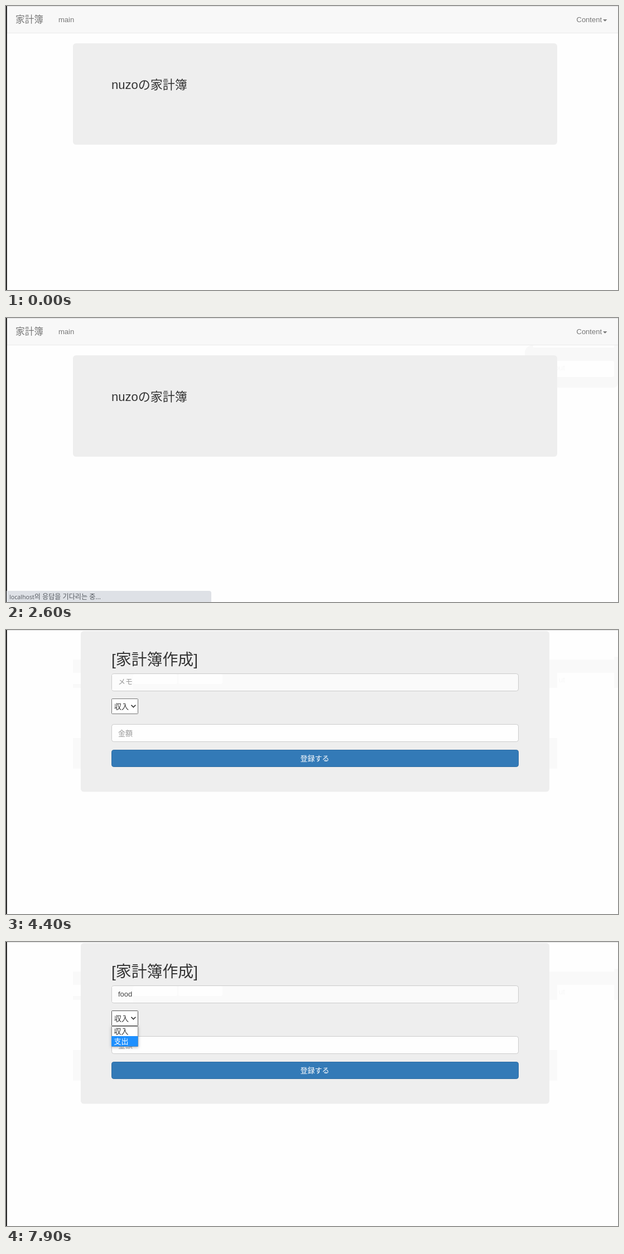
An HTML page with a canvas that plays this animation: 1097x510 px, repeating every 8 s.

```html
<!DOCTYPE html>
<html lang="ja">
<head>
<meta charset="utf-8">
<title>家計簿</title>
<style>
html, body { margin: 0; width: 100%; height: 100%; overflow: hidden; background: #fefefe; }
canvas { display: block; }
</style>
</head>
<body>
<canvas id="stage" width="1097" height="510"></canvas>
<script>
const ctx = document.getElementById('stage').getContext('2d');
const W = 1097, H = 510, LOOP = 8000;
const SANS = '"Liberation Sans", "Noto Sans CJK JP", sans-serif';
const UI = '"Open Sans", "Noto Sans CJK KR", sans-serif';
const GHOST = '#f9f9f9', PAPER = '#fefefe';

// Share of a fade done at time t, in steps of 100 ms
const fade = (t, start, steps) =>
  Math.max(0, Math.min(1, (Math.floor((t - start) / 100) + 1) / steps));

function rect(x, y, w, h, color) {
  ctx.fillStyle = color;
  ctx.fillRect(x, y, w, h);
}

function box(x, y, w, h, r, fill, stroke) {
  ctx.beginPath();
  ctx.roundRect(x, y, w, h, r);
  if (fill) { ctx.fillStyle = fill; ctx.fill(); }
  if (stroke) { ctx.strokeStyle = stroke; ctx.lineWidth = 1; ctx.stroke(); }
}

function text(str, x, y, color = '#333', size = 13, weight = '', family = SANS) {
  ctx.font = `${weight} ${size}px ${family}`;
  ctx.fillStyle = color;
  ctx.fillText(str, x, y);
}

function withAlpha(alpha, draw) {
  if (alpha <= 0) return;
  ctx.save();
  ctx.globalAlpha = alpha;
  draw();
  ctx.restore();
}

function shadow(color, blur, dy = 0) {
  ctx.shadowColor = color;
  ctx.shadowBlur = blur;
  ctx.shadowOffsetY = dy;
}

function frame() {
  rect(0, 0, W, 1, '#dcdcdc');
  rect(0, 0, 1, H, '#000');
  rect(1, 0, 1, H, '#555');
}

function navbar(mainY) {
  rect(2, 1, W, 47, '#f8f8f8');
  rect(2, 48, W, 1, '#e9e9e9');
  text('家計簿', 17, 30, '#777', 16.7);
  text('main', 94, mainY, '#777');
}

function contentLink(color, open) {
  if (open) rect(1009, 1, 82, 47, '#e7e7e7');
  text('Content', 1022.5, 29, color);
  ctx.beginPath();
  ctx.moveTo(1070, 24);
  ctx.lineTo(1077.5, 24);
  ctx.lineTo(1073.7, 27.8);
  ctx.fill();
}

function menu(hover) {
  ctx.save();
  shadow('rgba(0,0,0,.175)', 11, 5.6);
  box(942, 49, 149, 57, [0, 0, 4, 4], '#fff');
  ctx.restore();
  box(942.5, 48.5, 148, 57, [0, 0, 4, 4], null, '#d0d0d0');
  if (hover) rect(943, 54, 147, 23.5, '#f5f5f5');
  text('Household', 962, 70, hover ? '#262626' : '#333');
  text('Logout', 962, 94);
}

// Faint traces the closed menu leaves on the page
function menuGhost() {
  box(930, 49, 167, 76, [14, 0, 8, 14], '#f8f8f8');
  rect(945, 49, 145, 4, PAPER);
  box(945, 77, 145, 29, 3, PAPER);
  text('Logout', 962, 94, '#f7f7f7');
}

function status(str, tail, minWidth) {
  ctx.font = `10.7px ${UI}`;
  const w = ctx.measureText(str).width;
  box(1, 490, minWidth || w + 12, 20, [0, 4, 0, 0], '#dee1e6');
  text(str, 6, 505, '#555a60', 10.7, '', UI);
  if (tail) text(tail, 6 + w, 505, '#555a60', 12.1, '', UI);
}

const waiting = () => status('localhost', '의 응답을 기다리는 중...', 367);

function homePage(t) {
  if (t >= 2500) menuGhost();
  navbar(29);
  const open = t >= 1600 && t < 2500;
  contentLink(open ? '#555' : t >= 200 && t < 1600 ? '#333' : '#777', open);
  box(120, 67, 868, 182, 5.5, '#eee');
  text('nuzoの家計簿', 189, 149, '#333', 22);
  if (open) menu(t >= 2200);
  frame();
  if (t >= 2600) waiting();
  else withAlpha(fade(t, 500, 2), () =>
    status('localhost:8888/' + (t < 2200 ? '#' : 'household')));
}

function blueButton(label, x, w, hover) {
  const g = ctx.createLinearGradient(0, 67 - 15 * hover, 0, 95 - 15 * hover);
  g.addColorStop(0, '#0088cc');
  g.addColorStop(1, '#0044cc');
  box(x, 67, w, 28, 4, g);
  box(x + .5, 67.5, w - 1, 27, 4, null, 'rgba(0,50,130,.25)');
  text(label, x + 12.3, 86, '#fff');
}

function searchRow(label, hint, y, fill) {
  text(label, 2, y + 12);
  box(109.5, y + .5, 175, 18, 3.7, fill, '#ccc');
  text(hint, 115.5, y + 13.5, '#999');
}

function listPage(t) {
  menuGhost();
  box(120, 67, 868, 182, 5.5, GHOST);
  rect(988, 104, 109, 30, PAPER);
  navbar(25);
  blueButton('家計簿作成', 2, 88.5, fade(t, 3700, 2));
  blueButton('総収入', 95, 63, 0);
  blueButton('総支出', 162.5, 63, 0);
  blueButton('最小金額', 230, 76, 0);
  blueButton('最高金額', 310, 76, 0);

  rect(2, 104, W, 91, '#e3e3e3');
  rect(2, 105, W, 89, '#f5f5f5');
  const heads = [['No.', 28], ['メモ', 174], ['タイプ', 339], ['金額', 557], ['作成日', 722]];
  for (const [label, x] of heads) text(label, x, 143, '#333', 13, 'bold');
  rect(20, 155.5, 1067, 1.8, '#d9d9d9');

  searchRow('総収入 or 総支出 :', '総収入 or 総支出', 232, GHOST);
  searchRow('最小 or 最高金額 :', '最小 or 最高金額', 270, '#fff');
  frame();
  withAlpha(1 - fade(t, 3100, 3), waiting);
}

function formGhosts() {
  for (const x of [120, 974]) {
    rect(x, 53, 14, 24, GHOST);
    rect(x, 97, 14, 7, GHOST);
    rect(x, 194, 14, 55, GHOST);
  }
  rect(974, 53, 123, 24, GHOST);
  rect(974, 77, 14, 27, GHOST);
  rect(1090, 48, 7, 56, GHOST);
  text('ut', 991, 94, '#f7f7f7');
}

function memoField(t) {
  const focus = fade(t, 5000, 2) - fade(t, 7500, 2);
  withAlpha(focus, () => {
    shadow('rgba(102,175,233,.7)', 7);
    box(189, 78, 730, 32, 4, '#fff');
  });
  box(189.5, 78.5, 729, 31, 3.7, '#fafafa', '#ccc');
  rect(190, 80, 38, 28, '#fcfcfc');
  box(228, 79, 79, 18, 3, '#fefefe');
  box(309, 79, 79, 18, 3, '#fefefe');
  withAlpha(focus, () => box(189.5, 78.5, 729, 31, 3.7, null, '#66afe9'));

  const typed = 'food'.slice(0, [6100, 6200, 6300, 6500].filter(at => t >= at).length);
  if (typed) text(typed, 201, 98, '#444');
  else text('メモ', 201, 97, '#999');
  const caret = (t >= 5000 && t < 5500) || (t >= 6000 && t < 7000);
  if (caret) rect(Math.round(201 + ctx.measureText(typed).width), 86, 1, 15, '#333');
}

function select(t) {
  box(189.5, 123.5, 47, 27, 1, '#fff', t >= 7300 ? '#555' : '#767676');
  text('収入', 194, 141.5);
  ctx.beginPath();
  ctx.moveTo(224.5, 134.8);
  ctx.lineTo(228.4, 138.7);
  ctx.lineTo(232.3, 134.8);
  ctx.strokeStyle = '#222';
  ctx.lineWidth = 1.6;
  ctx.stroke();
}

function options(t) {
  ctx.save();
  shadow('rgba(0,0,0,.3)', 5, 1);
  rect(189, 151, 48, 37, '#fff');
  ctx.restore();
  box(189.5, 151.5, 47, 36, 0, '#fff', '#8a8a8a');
  const picked = t >= 7900 ? 1 : 0;
  ['収入', '支出'].forEach((label, i) => {
    const on = i === picked;
    if (on) rect(189, 151 + 18 * i, 47.5, 18.5, '#1e90ff');
    text(label, 193.5, 165 + 18 * i, on ? '#fff' : '#333');
  });
}

function formPage(t) {
  formGhosts();
  box(134, 2, 840, 288.5, 5.5, '#eee');
  text('[家計簿作成]', 189, 63, '#333', 27.9);
  memoField(t);
  select(t);
  box(189.5, 169.5, 729, 31, 3.7, '#fefefe', '#ccc');
  text('金額', 201, 189.5, '#999');
  box(189.5, 215.5, 729, 30, 3.7, '#337ab7', '#2e6da4');
  text('登録する', 527.5, 234.5, '#fff');
  frame();
  withAlpha(fade(t, 7600, 2), () => options(t));
}

function draw(t) {
  rect(0, 0, W, H, PAPER);
  (t < 2900 ? homePage : t < 4300 ? listPage : formPage)(t);
}

const start = performance.now();
function tick() {
  draw((performance.now() - start) % LOOP);
  requestAnimationFrame(tick);
}
tick();
</script>
</body>
</html>
```
